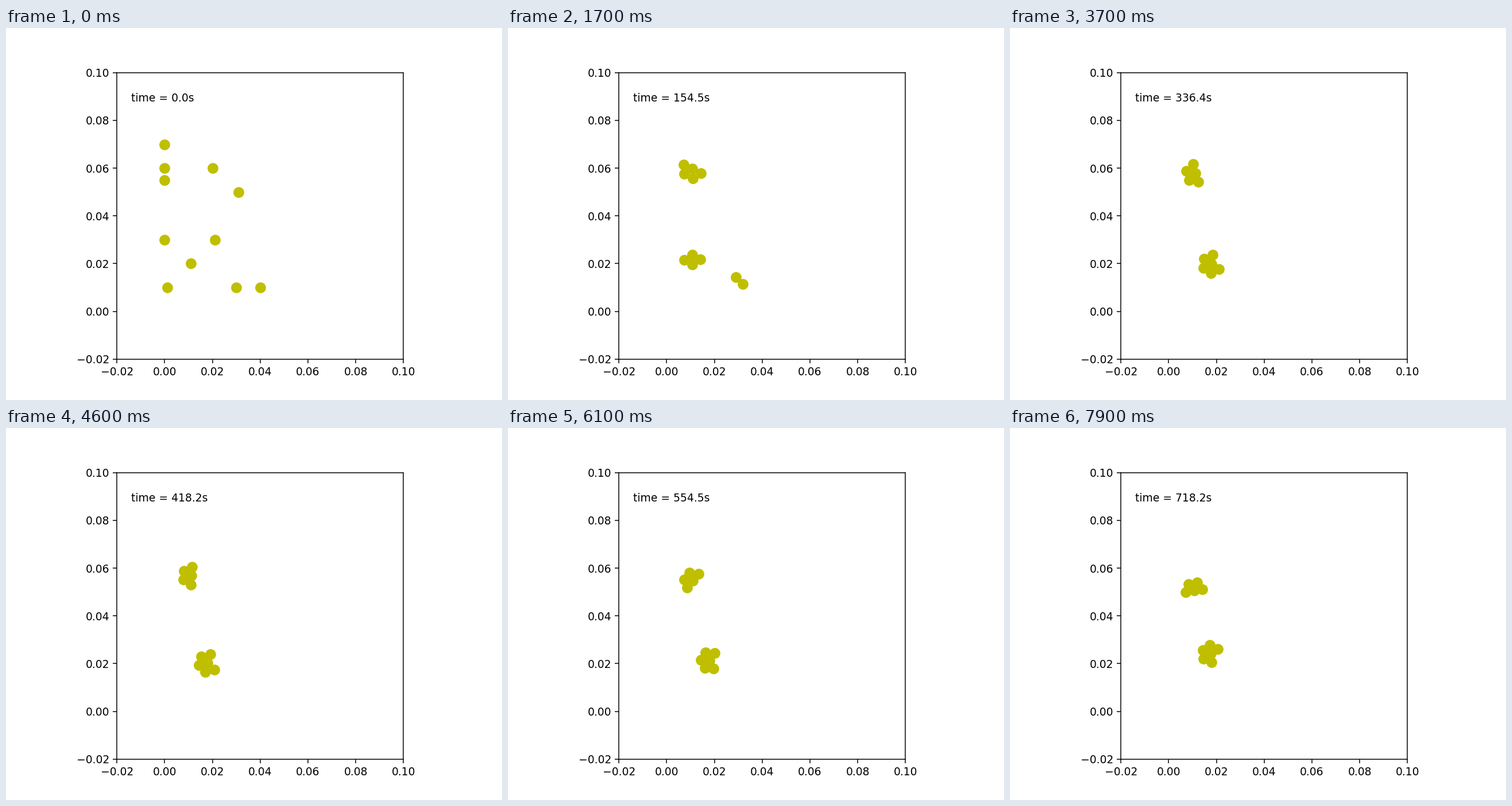
Write a matplotlib script that moves like this. It is 864 px wide and 648 px high and loops after 8 s.

```python
import numpy as np
import matplotlib.pyplot as plt
from matplotlib.animation import FuncAnimation

FRAMES, INTERVAL = 80, 100
SECONDS_PER_FRAME = 900 / 99

# Floating discs, positions as x + iy in millimetres.
UPPER = np.array([70j, 60j, 55j, 20 + 60j, 31 + 50j])
LOWER = np.array([1 + 10j, 30j, 21 + 30j, 11 + 20j, 30 + 10j, 40 + 10j])
COM = (UPPER.sum() + LOWER.sum()) / 11


def turn(deg):
    return np.exp(1j * np.radians(deg))


# Packed clusters in units of the disc spacing, centred on their centroid.
PAIR = np.array([-0.5, 0.5])
TRIO = turn(np.array([120, 0, -120])) / np.sqrt(3)
RHOMB = np.array([-np.sqrt(0.75), 0.5j, np.sqrt(0.75), -0.5j])
FIVE = np.array([-1 + 0.3464j, 0.3464j, -0.5 - 0.5196j,
                 0.5 - 0.5196j, 1 + 0.3464j])
SIX = 1 / 6 + np.append(turn(np.array([120, 60])),
                        np.append(0, turn(np.array([180, -60, -120]))))


def blend(a, b, t, t0, t1, power=1.0):
    w = np.clip((t - t0) / (t1 - t0), 0, 1) ** power
    return a + w * (b - a)


def approach(t, r0, scale, rate, contact):
    """Two bodies falling together from rest under a decaying attraction."""
    phase = min(rate * t, 1.56)
    return max(r0 + scale * np.log(np.cos(phase)), contact)


def group_gap(t):
    """Vector from the upper group's centroid to the lower one's."""
    dy = 27.51 + 5.58 * np.log((86.73 - t) / 7.73)
    dx = 7.215 + 0.03 * (t - 17) - 0.2 * (39.78 - dy)
    return dx - 1j * dy


def upper_group(t, centre, size):
    packed = centre + size * FIVE * turn(-27 - 2.315 * (t - 17))
    if t >= 12:
        return packed
    gap = approach(t, 26.36, 5.5, 0.1396, 5.0) * turn(-14.7 - 0.3 * t)
    trio = centre - 0.4 * gap + size * TRIO * turn(1.2 * t)
    pair = centre + 0.6 * gap + size * PAIR * turn(36 + 3.3 * (t - 9))
    loose = np.append(blend(UPPER[:3], trio, t, 0, 2, 1.5),
                      blend(UPPER[3:], pair, t, 0, 4, 1.8))
    return blend(loose, packed, t, 11, 12)


def lower_group(t, centre, size):
    packed = centre + size * SIX * turn(35.5 - 1.167 * (t - 28))
    if t >= 22:
        return packed
    gap = approach(t, 29.53, 6.8, 0.07376, 6.7) * turn(-25 + 0.06 * t)
    four = centre - gap / 3 + size * RHOMB * turn(29 - 3.5 * (t - 9))
    pair = centre + gap * 2 / 3 + size * PAIR * turn(-2.5 * t)
    loose = np.append(blend(LOWER[:4], four, t, 0, 3, 2),
                      blend(LOWER[4:], pair, t, 0, 1))
    return blend(loose, packed, t, 20.8, 21.8)


def positions(t):
    sep = group_gap(t)
    size = min(4.0, 4.0 - 0.006 * (t - 17))
    z = np.append(upper_group(t, COM - sep * 6 / 11, size),
                  lower_group(t, COM + sep * 5 / 11, size))
    return z.real / 1000, z.imag / 1000


fig = plt.figure(figsize=(6.4, 4.8), dpi=135)
ax = fig.add_subplot(111, aspect="equal", xlim=(-0.02, 0.1), ylim=(-0.02, 0.1))
discs, = ax.plot([], [], "yo", markersize=9)
clock = ax.text(0.05, 0.9, "", transform=ax.transAxes)


def update(t):
    discs.set_data(*positions(t))
    clock.set_text(f"time = {t * SECONDS_PER_FRAME:.1f}s")
    return discs, clock


anim = FuncAnimation(fig, update, frames=FRAMES, interval=INTERVAL,
                     repeat=True, repeat_delay=0)
plt.show()
```
